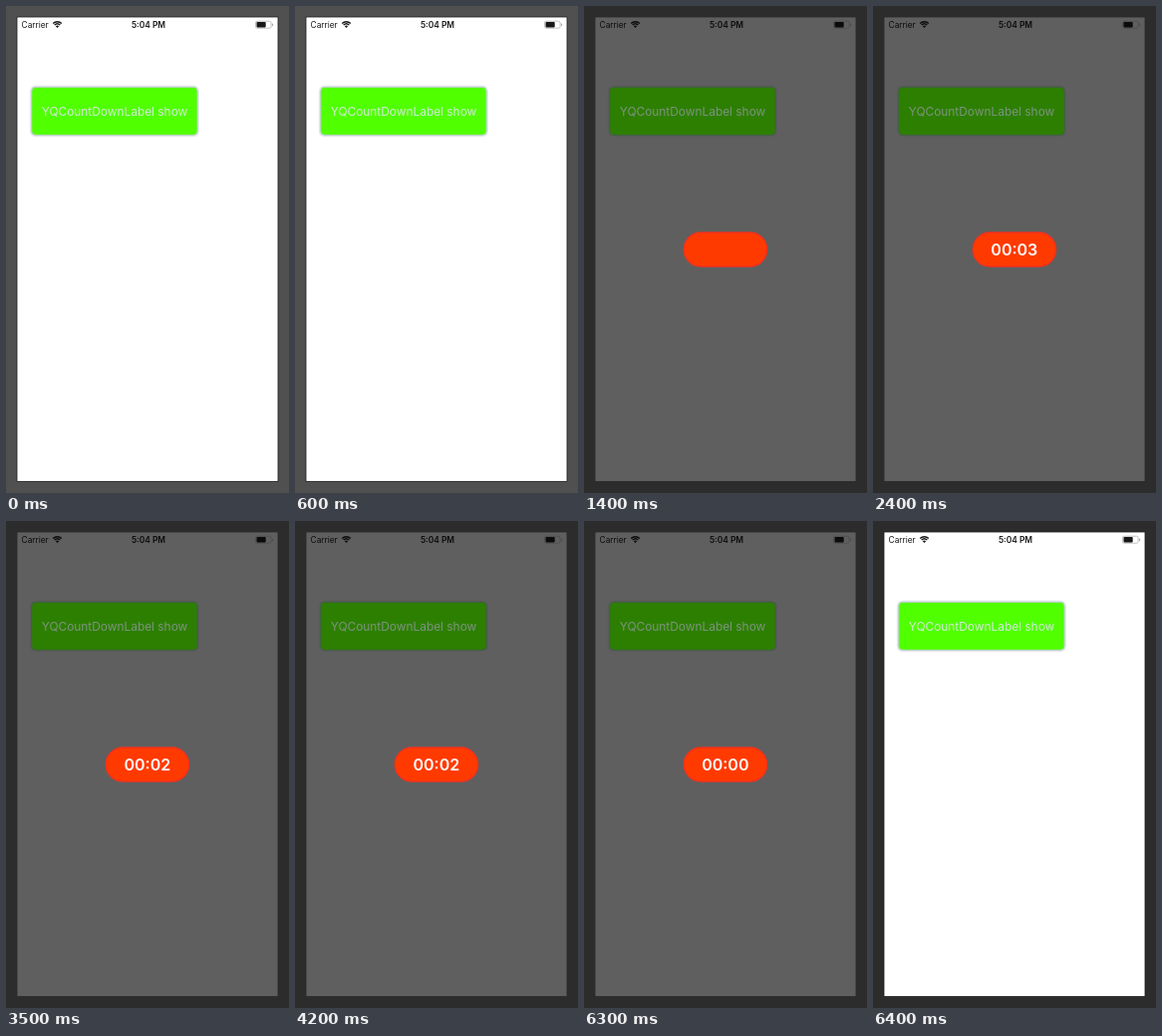
Animation, 284 px wide and 488 px high, one loop 7300 ms. Source, as an HTML page with a canvas:

```html
<!DOCTYPE html>
<html lang="en">
<head>
<meta charset="utf-8">
<title>Countdown label</title>
<style>
html, body { margin: 0; width: 100%; height: 100%; overflow: hidden; background: #2b2b2b; }
canvas { display: block; width: 284px; height: 488px; }
</style>
</head>
<body>
<canvas id="stage" width="284" height="488"></canvas>
<script>
const ctx = document.getElementById('stage').getContext('2d');
const LOOP = 7300, SHOW = 1400, HIDE = 6400;
const FIRST_TICK = 2300, TICK = 1000;
const FONT = 'Inter, "Liberation Sans", sans-serif';

const light = {
  screen: '#ffffff', edge: '#1c1c1c', ink: '#171717', faint: '#a8a8a8',
  button: '#50ff00', rim: '#b8d3c4', glow: '#e6e6ee', label: '#d5e8da'
};
const dim = {
  screen: '#5f5f5f', edge: '#292929', ink: '#0b0b0b', faint: '#4b4b4b',
  button: '#2d7f02', rim: '#3f6140', glow: '#5b5b5d', label: '#7d937d'
};

function pill(x, y, w, h, r, fill, stroke, line = 1) {
  ctx.beginPath();
  ctx.roundRect(x, y, w, h, r);
  if (fill) { ctx.fillStyle = fill; ctx.fill(); }
  if (stroke) { ctx.strokeStyle = stroke; ctx.lineWidth = line; ctx.stroke(); }
}

function text(str, x, y, size, weight, color, align = 'center') {
  ctx.font = `${weight} ${size}px ${FONT}`;
  ctx.textAlign = align;
  ctx.fillStyle = color;
  ctx.fillText(str, x, y);
}

function wifi(x, y, color) {
  const a = Math.PI * 1.26, b = Math.PI * 1.74;
  ctx.strokeStyle = ctx.fillStyle = color;
  ctx.lineWidth = 1.4;
  for (const r of [4.1, 6.3]) {
    ctx.beginPath();
    ctx.arc(x, y, r, a, b);
    ctx.stroke();
  }
  ctx.beginPath();
  ctx.moveTo(x, y);
  ctx.arc(x, y, 2.4, a, b);
  ctx.fill();
}

function statusBar(c) {
  text('Carrier', 15.6, 21.5, 8.3, 400, c.ink, 'left');
  wifi(51.5, 22, c.ink);
  text('5:04 PM', 143, 21.5, 8.4, 600, c.ink);
  pill(250.5, 15.2, 15.6, 7, 1.6, null, c.faint, 0.7);
  pill(251.5, 16, 9.2, 5.4, 0.8, c.ink);
  pill(267, 17.4, 1.1, 2.7, 0.5, c.faint);
}

function button(c) {
  pill(25.3, 81, 167.2, 48.8, 4.5, null, c.glow, 3);
  pill(25.7, 81.3, 166.4, 48, 4, c.button, c.rim, 1);
  text('YQCountDownLabel show', 109, 110, 11.9, 400, c.label);
}

function countdown(t) {
  pill(100.2, 227, 83.4, 34, 17, '#ff3a00', '#f5301c', 1.3);
  if (t < FIRST_TICK) return;
  const left = Math.max(0, 3 - Math.floor((t - FIRST_TICK) / TICK));
  text('00:0' + left, 141.8, 249.8, 16, 600, '#ffffff');
}

function draw(t) {
  const shown = t >= SHOW && t < HIDE;
  const c = shown ? dim : light;
  ctx.fillStyle = t < 1300 ? '#505050' : '#2c2c2c';
  ctx.fillRect(0, 0, 284, 488);
  pill(11, 11, 262, 465.5, 0, c.screen, c.edge, 0.8);
  statusBar(c);
  button(c);
  if (shown) countdown(t);
}

const start = performance.now();
function frame() {
  draw((performance.now() - start) % LOOP);
  requestAnimationFrame(frame);
}
frame();
</script>
</body>
</html>
```
